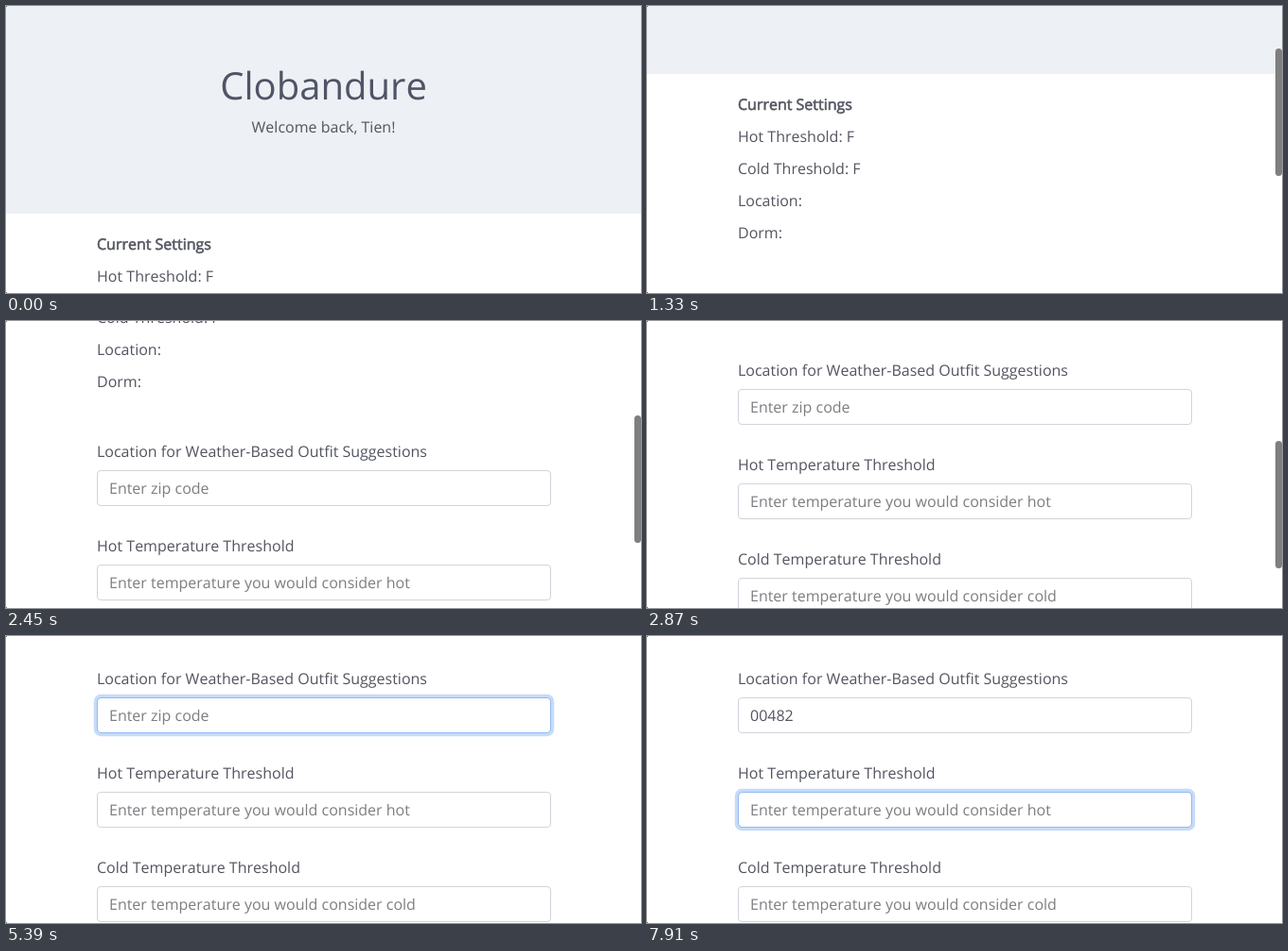
These frames come from a looping animation (671 px wide and 304 px high, 8 s). An HTML page:

```html
<!DOCTYPE html>
<html lang="en">
<head>
<meta charset="utf-8">
<title>Settings</title>
<style>
  html, body { margin: 0; width: 100%; height: 100%; overflow: hidden; background: #fff; }
  #stage {
    position: relative; width: 671px; height: 304px; overflow: hidden; background: #fff;
    font: 16px/24px "Open Sans", sans-serif; color: #535560;
    font-kerning: none; text-rendering: geometricPrecision;
  }
  #page { position: absolute; inset: 0 0 auto; height: 740px; }
  #page > * { position: absolute; margin: 0; white-space: nowrap; }
  header { left: 0; top: 0; width: 671px; height: 220px; background: #edf0f5; text-align: center; }
  header > * { position: absolute; left: 0; width: 100%; margin: 0; }
  h1 { top: 60px; font-size: 40px; line-height: 48px; font-weight: 400; color: #505466; }
  header p { top: 116px; }
  .line { left: 96px; }
  .strong { -webkit-text-stroke: .6px currentColor; }
  .field {
    left: 96px; width: 480px; height: 38px; box-sizing: border-box; padding: 6px 12px;
    border: 1px solid #d0d4da; border-radius: 4px; background: #fff; color: #7d7e82;
  }
  .field.filled { color: #535560; }
  .ring {
    position: absolute; inset: -1px; border: 1px solid #93baf5; border-radius: 4px;
    box-shadow: 0 0 0 3.2px #c6dbf9; opacity: 0;
  }
  .caret { position: absolute; left: 12px; top: 7px; width: 1px; height: 22px; background: #495057; }
  #thumb {
    position: absolute; left: 664px; top: 0; width: 7px; height: 135px;
    border-radius: 3.5px; background: #7f7f7f;
  }
  .corner { position: absolute; left: 0; width: 1px; height: 1px; background: #777; }
</style>
</head>
<body>
<div id="stage">
  <div id="page">
    <header>
      <h1>Clobandure</h1>
      <p>Welcome back, Tien!</p>
    </header>
    <p class="line strong" style="top:240px">Current Settings</p>
    <p class="line" style="top:274px">Hot Threshold: F</p>
    <p class="line" style="top:308px">Cold Threshold: F</p>
    <p class="line" style="top:342px">Location:</p>
    <p class="line" style="top:376px">Dorm:</p>

    <p class="line" style="top:450px">Location for Weather-Based Outfit Suggestions</p>
    <div class="field" id="zip" style="top:482px"><span class="text">Enter zip code</span><i class="ring"></i><i class="caret"></i></div>
    <p class="line" style="top:550px">Hot Temperature Threshold</p>
    <div class="field" id="hot" style="top:582px"><span class="text">Enter temperature you would consider hot</span><i class="ring"></i><i class="caret"></i></div>
    <p class="line" style="top:650px">Cold Temperature Threshold</p>
    <div class="field" style="top:682px">Enter temperature you would consider cold</div>
  </div>
  <div id="thumb"></div>
  <i class="corner" style="top:0"></i>
  <i class="corner" style="bottom:0"></i>
</div>
<script>
  const LOOP = 8000, TICK = 70;
  const ZIP = "00482", KEYS = [5880, 6020, 6090, 6300, 6580];
  const HINT = "Enter zip code";

  const $ = (sel, root = document) => root.querySelector(sel);
  const parts = id => {
    const box = $(id);
    return { box, text: $(".text", box), ring: $(".ring", box), caret: $(".caret", box) };
  };
  const page = $("#page"), thumb = $("#thumb");
  const zip = parts("#zip"), hot = parts("#hot");

  const ramp = (t, from, to) => Math.min(1, Math.max(0, (t - from) / (to - from)));
  const within = (t, from, to) => t >= from && t < to;

  // Smoothstep, skewed in time by a power
  function glide(p, skew) {
    const q = p ** skew;
    return q * q * (3 - 2 * q);
  }

  const scrollAt = t => Math.round(
    225 * glide(ramp(t, 840, 1610), 1.103) +
    192 * glide(ramp(t, 1960, 3010), 0.88));

  function setText(part, value) {
    if (part.text.textContent !== value) part.text.textContent = value;
  }

  function showCaret(part, on) {
    part.caret.style.opacity = on ? 1 : 0;
  }

  function render(time) {
    // The screen refreshes in fixed ticks
    const t = Math.min(Math.floor(time / TICK) * TICK, 7910);

    const y = scrollAt(t);
    page.style.transform = `translateY(${-y}px)`;
    thumb.style.transform = `translateY(${Math.round(0.313 * y - 1.5)}px)`;
    thumb.style.opacity = t < 910 ? 0 : 1 - ramp(t, 3500, 3780);

    const moved = ramp(t, 7280, 7490);
    zip.ring.style.opacity = ramp(t, 4760, 4970) * (1 - moved);
    hot.ring.style.opacity = moved;

    const typed = KEYS.filter(k => k <= t).length;
    setText(zip, typed ? ZIP.slice(0, typed) : HINT);
    zip.box.classList.toggle("filled", typed > 0);
    const end = typed ? zip.text.offsetWidth : 0;
    zip.caret.style.left = 12 + end + "px";

    showCaret(zip, within(t, 4830, 5250) || within(t, 5810, 7140));
    showCaret(hot, within(t, 7350, 7910));
  }

  let start;
  function frame(now) {
    start ??= now;
    render((now - start) % LOOP);
    requestAnimationFrame(frame);
  }
  render(0);
  requestAnimationFrame(frame);
</script>
</body>
</html>
```
